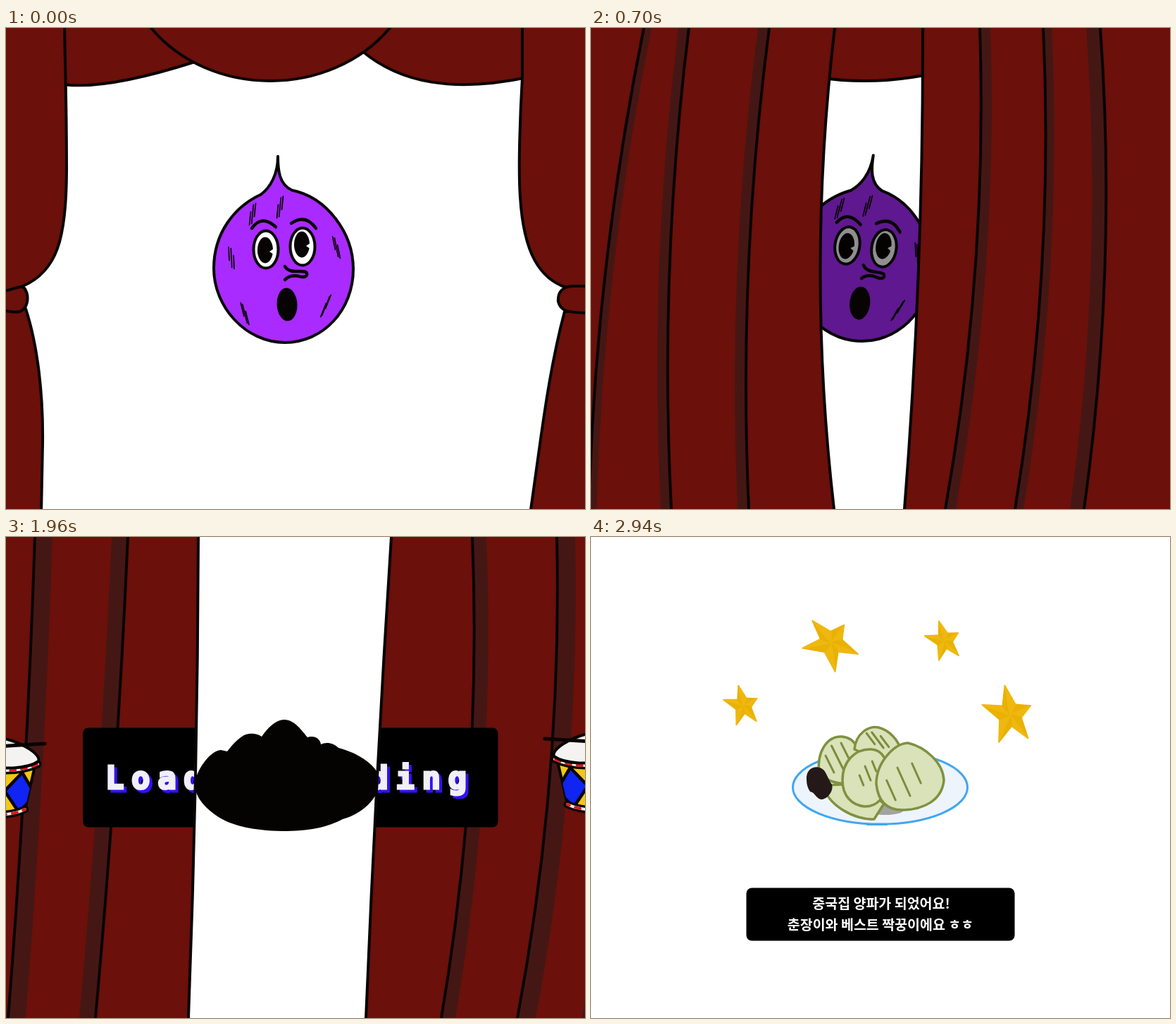
An HTML page with a canvas that plays this animation: 822x682 px, repeating every 3080 ms.

```html
<!DOCTYPE html>
<html lang="ko">
<head>
<meta charset="utf-8">
<style>
html, body { margin: 0; width: 100%; height: 100%; overflow: hidden; background: #fff; }
canvas { display: block; }
</style>
</head>
<body>
<canvas id="stage" width="822" height="682"></canvas>
<script>
const W = 822, H = 682, STEP = 140, SLOTS = 22;
const RED = '#6b100a', FOLD = '#451714', INK = '#080403';
const ctx = document.getElementById('stage').getContext('2d');
const lerp = (a, b, k) => a + (b - a) * k;

function shape(d, fill, line, width = 4) {
  const path = new Path2D(d);
  if (fill) { ctx.fillStyle = fill; ctx.fill(path); }
  if (line) { ctx.strokeStyle = line; ctx.lineWidth = width; ctx.stroke(path); }
  return path;
}
function oval(x, y, rx, ry, fill, line, turn = 0, width = 4) {
  ctx.beginPath();
  ctx.ellipse(x, y, rx, ry, turn, 0, 7);
  ctx.fillStyle = fill;
  ctx.fill();
  if (line) { ctx.strokeStyle = line; ctx.lineWidth = width; ctx.stroke(); }
}
function box(x, y, w, h) {
  ctx.beginPath();
  ctx.roundRect(x, y, w, h, 8);
  ctx.fillStyle = '#000';
  ctx.fill();
}
function group(draw) { ctx.save(); draw(); ctx.restore(); }

// A row of parallel strokes, the middle one longest.
function hatch(x, y, lean, length, gapX, gapY, color, width) {
  for (let i = -1; i < 2; i++) {
    const dy = length * (i ? 0.35 : 0.5), dx = dy * lean;
    const [cx, cy] = [x + i * gapX, y + i * gapY];
    shape(`M${cx - dx} ${cy - dy}L${cx + dx} ${cy + dy}`, null, color, width);
  }
}

// ---- curtains: folds are [top x, bottom x, shade width], edges [top x, bottom x, bow]
const CLOSED = [[135, 109, -33], [277, 249, -30], [406, 376, -9],
                [547, 502, 27], [663, 629, 16], [769, 767, 80]];
const CLOSING = [
  { speed: 57, side: -1, bow: -15, edge: [289, 288, -20],
    folds: [[18, -60, 11], [82, 57, -15], [196, 167, -16]] },
  { speed: -57, side: 1, bow: 18, edge: [528, 502, 7],
    folds: [[609, 560, 15], [699, 659, 12], [780, 757, -20]] }
];
const OPENING = [
  { speed: -79, side: -1, bow: 4, edge: [352, 338, 3],
    folds: [[30, 0, -40], [120, 82, 25], [252, 206, -23]] },
  { speed: 85, side: 1, bow: 18, edge: [462, 426, -2],
    folds: [[577, 533, 20], [697, 641, 26], [803, 767, -34]] }
];

const bowed = (top, bottom, bow) =>
  `M${top} 0Q${(top + bottom) / 2 + 2 * bow} ${H / 2} ${bottom} ${H}`;

function drawFolds(folds, bow) {
  for (const [top, bottom, shade] of folds) {
    const line = bowed(top, bottom, bow);
    const back = bowed(bottom + shade, top + shade, bow)
      .replace('M', 'L').replace(' 0Q', ` ${H}Q`).replace(/\d+$/, '0');
    shape(line + back, FOLD);
    shape(line, null, INK);
  }
}
function drawHalf({ speed, side, bow, edge, folds }, step, extras) {
  group(() => {
    ctx.translate(speed * step, 0);
    const line = bowed(...edge), far = side * 1400;
    const area = shape(`${line}L${far} ${H}L${far} 0Z`, RED);
    group(() => {
      ctx.clip(area);
      drawFolds(folds, bow);
      if (extras) extras();
    });
    shape(line, null, INK);
  });
}

// ---- opening scene
function drawTiedCurtains() {
  shape('M-4 -4H83C84 60 86 100 86 200C86 300 72 345 24 366L-4 376Z', RED, INK);
  shape('M-4 398H28C45 450 53 520 52 590L50 690H-4Z', RED, INK);
  shape('M-4 373C10 372 22 362 27 370C34 382 30 398 20 402Q10 404 -4 400', RED, INK);
  shape('M826 -4H733V70C730 120 727 200 730 240C735 320 758 355 795 368H826Z', RED, INK);
  shape('M826 402H793C775 470 765 540 758 590L744 690H826Z', RED, INK);
  shape('M826 366H805C788 366 783 377 784 388C787 400 795 404 826 404', RED, INK);
}
function drawValance(k) {
  shape('M70 -4V78Q130 92 268 48L300 -4Z', RED, INK);
  shape('M480 -4L506 33C560 78 635 92 740 70V-4Z', RED, INK);
  shape(`M${lerp(206, 150, k)} 0C290 100 ${lerp(460, 480, k)} 100 ${lerp(545, 645, k)} 0`, RED, INK);
}
function drawOnion(k) {
  group(() => {
    ctx.translate(390 - 5 * k, 320 - 2 * k);
    ctx.rotate(7 * k * Math.PI / 180);
    ctx.translate(-390, -320);
    const body = shape('M386 182C386 202 388 222 406 230C455 240 493 290 493 342C493 400 450 446 396 446C340 446 295 395 295 341C295 290 325 253 362 236C375 226 386 208 386 182Z', '#a92bff', INK);
    const marks = [[350, 264, -0.1], [389, 254, -0.1], [320, 326, 0.05],
                   [469, 311, 0.2], [339, 405, 0.25], [454, 394, -0.4]];
    for (const [x, y, lean] of marks) hatch(x, y, lean, 27, 3.5, lean > 0 ? 6 : -6, INK, 1.7);
    for (const [x, y, dy] of [[369, 314, 1], [421, 310, -3]]) {
      oval(x, y, 17.5, 26.5, '#fff', INK);
      oval(x - 1, y + dy, 11, 18.5, INK);
      shape(`M${x + 5} ${y + dy + 2}l6 -4v8Z`, '#fff');
    }
    ctx.fillStyle = `rgba(0,0,0,${0.35 * k})`;
    ctx.fill(body);
    shape('M349 284Q363 264 383 282M405 277Q425 263 440 284M396 338C402 349 418 343 426 346C430 351 424 355 416 352C408 350 400 352 396 357', null, INK, 4.5);
    oval(399, 392, 14.5, 23.5, INK, null, -0.05);
  });
}

// ---- drums and loading card
function drawStick(x, y, tailX, tailY) {
  shape(`M${x} ${y}L${tailX} ${tailY}`, null, INK, 5);
  oval(x, y, 8, 8, INK);
}
function drawDrum(raised, shift = 0, raisedY = 225) {
  const body = shape('M68 288L61 348C75 380 110 386 140 386Q165 385 178 376L192 315Z', '#f2c714', INK);
  group(() => {
    ctx.clip(body);
    for (let i = 0; i < 3; i++) {
      shape(`M${88 + 43 * i} ${312 + 6 * i}l19 32l-24 24l-20 -30Z`, '#1024f2', INK, 4.5);
    }
  });
  const top = 'M69 292C82 308 100 315 122 319C150 323 175 322 196 312';
  const base = 'M60 349C72 375 105 384 140 384Q165 383 178 376';
  for (const rim of [top, base]) {
    shape(rim, null, INK, 11);
    shape(rim, null, '#f5f2f0', 4);
    ctx.setLineDash([7, 9]);
    shape(rim, null, '#d41c1c', 4);
    ctx.setLineDash([]);
  }
  shape('M67 286C75 268 125 268 160 279C185 288 200 300 197 308C180 320 145 319 118 314C90 308 70 298 67 286Z', '#f4f3f2', INK);
  ctx.translate(shift, 0);
  drawStick(...raised ? [134, raisedY, 68, 243] : [124, 286, 70, 246]);
  drawStick(...raised ? [140, 287, 206, 283] : [153, 259, 220, 256]);
}
function drawRightDrum(raised) {
  ctx.translate(819, -1);
  ctx.scale(-1, 1);
  drawDrum(raised, 4, 239);
}
function drawCard() {
  box(251, 271, 325.5, 141);
  ctx.font = 'bold 44px "DejaVu Sans Mono", monospace';
  ctx.letterSpacing = '10.6px';
  ctx.textAlign = 'left';
  ctx.lineWidth = 3;
  ctx.lineJoin = 'miter';
  for (const [offset, color] of [[4, '#3311f5'], [0, '#f1effa']]) {
    ctx.fillStyle = ctx.strokeStyle = color;
    ctx.fillText('Loading', 283 + offset, 357 + offset);
    ctx.strokeText('Loading', 283 + offset, 357 + offset);
  }
  ctx.lineJoin = 'round';
  ctx.letterSpacing = '0px';
}
function drawMound() {
  shape('M268 350C270 330 290 303 305 302L314 304C325 290 335 280 345 279Q355 278 363 283C372 270 383 259 395 259C410 259 420 275 428 284C438 281 446 286 447 294C455 290 465 292 472 299C500 306 530 325 531 346C530 370 505 393 478 400C455 412 430 417 392 417C350 416 325 410 305 399C285 387 268 370 268 350Z', '#040302');
}

// ---- final dish
const STARS = [[216, 239, 0.7, 213], [341, 150, 1, 186], [502, 147, 0.7, 210], [595, 252, 1.02, 216]];
const tipAngle = i => 72 * i + 8 * Math.sin(2.5 * (i % 5));

function drawStar(x, y, scale, turn) {
  const at = (deg, r) => {
    const a = (deg + turn) * Math.PI / 180;
    return `${x + Math.cos(a) * r * scale} ${y + Math.sin(a) * r * scale}`;
  };
  for (let i = 5; i < 10; i++) {
    const tip = at(tipAngle(i), i == 5 ? 31 : 41);
    for (const [next, color] of [[i - 1, '#e9b103'], [i + 1, '#efb80f']]) {
      const notch = at((tipAngle(i) + tipAngle(next)) / 2, 16);
      shape(`M${x} ${y}L${tip}L${notch}Z`, color, color, 2);
    }
  }
}
function drawDish(k) {
  const slice = d => shape(d, '#d9e2b8', '#7f9140', 3.5);
  const score = (...at) => hatch(...at, '#7c8b3c', 3);
  shape('M380 402H432L420 409H392Z', '#3fa5ee');
  oval(410.5, 355, 124, 52, `rgb(${lerp(241, 237, k)},${lerp(241, 244, k)},${lerp(241, 251, k)})`, '#43a6ee', 0, 3);
  oval(418, 387, 26, 7, '#a3a3a0');
  slice('M330 352C335 380 375 402 402 400L416 378L380 350Z');
  slice('M324 335C320 305 335 282 356 283C377 285 384 305 378 325L366 350C345 350 335 345 324 335Z');
  score(350, 313, 0.5, 34, 11, -9);
  slice('M374 301C376 278 395 267 408 270C424 274 436 288 440 302L410 318Z');
  score(407, 288, 0.75, 22, 10, 2);
  slice('M357 345C357 318 375 300 398 301C414 302 424 318 421 344C419 370 405 383 388 382C370 380 357 367 357 345Z');
  score(393, 335, 0.4, 20, 9, -10);
  slice('M405 350C405 320 430 293 450 292C475 298 500 320 501 345C498 375 470 386 445 387C425 388 408 380 405 350Z');
  score(444, 347, 0.45, 40, 18, -12);
  shape('M306 344C305 329 317 323 327 328C334 331 335 341 342 351C345 360 335 373 326 372C319 370 318 362 311 361Q306 354 306 344Z',
    `rgb(${lerp(25, 36, k)},25,24)`);

  box(220.5, 497.5, 381, 75);
  ctx.fillStyle = '#fff';
  ctx.font = '900 19.5px "Noto Sans CJK KR", "Noto Sans CJK", sans-serif';
  ctx.textAlign = 'center';
  ctx.fillText('중국집 양파가 되었어요!', 412, 527);
  ctx.fillText('춘장이와 베스트 짝꿍이에요 ㅎㅎ', 411, 557);

  for (const [x, y, scale, turn] of STARS) drawStar(x, y, scale, turn + 120 * k);
}

// ---- timeline
function drawClosing(slot) {
  const k = slot / 4;
  drawValance(Math.min(k, 1));
  drawOnion(k);
  if (!slot) return drawTiedCurtains();
  for (const half of CLOSING) drawHalf(half, slot - 4);
}
function drawShow(slot) {
  const raised = slot % 2 == 1;
  ctx.fillStyle = '#6e140c';
  ctx.fillRect(0, 0, W, H);
  drawFolds(CLOSED, 0);
  drawCard();
  group(() => drawDrum(raised));
  group(() => drawRightDrum(raised));
}
function drawOpening(slot) {
  const step = Math.max(slot - 13, 0);
  if (!step) shape('M340 -4V72Q406 81 475 70V-4Z', FOLD, INK);
  drawMound();
  drawHalf(OPENING[0], step, () => {
    group(() => { ctx.translate(-63, -0.5); drawCard(); });
    group(() => { ctx.translate(-72, 10); drawDrum(true); });
  });
  drawHalf(OPENING[1], step, () => {
    group(() => { ctx.translate(37, -0.5); drawCard(); });
    group(() => { ctx.translate(71, 4); drawRightDrum(true); });
  });
}
function frame() {
  const slot = Math.floor(performance.now() / STEP) % SLOTS;
  ctx.fillStyle = '#fff';
  ctx.fillRect(0, 0, W, H);
  ctx.lineCap = ctx.lineJoin = 'round';
  if (slot < 6) drawClosing(slot);
  else if (slot < 12) drawShow(slot);
  else if (slot < 17) drawOpening(slot);
  else drawDish((slot - 17) / 4);
  requestAnimationFrame(frame);
}
frame();
</script>
</body>
</html>
```
